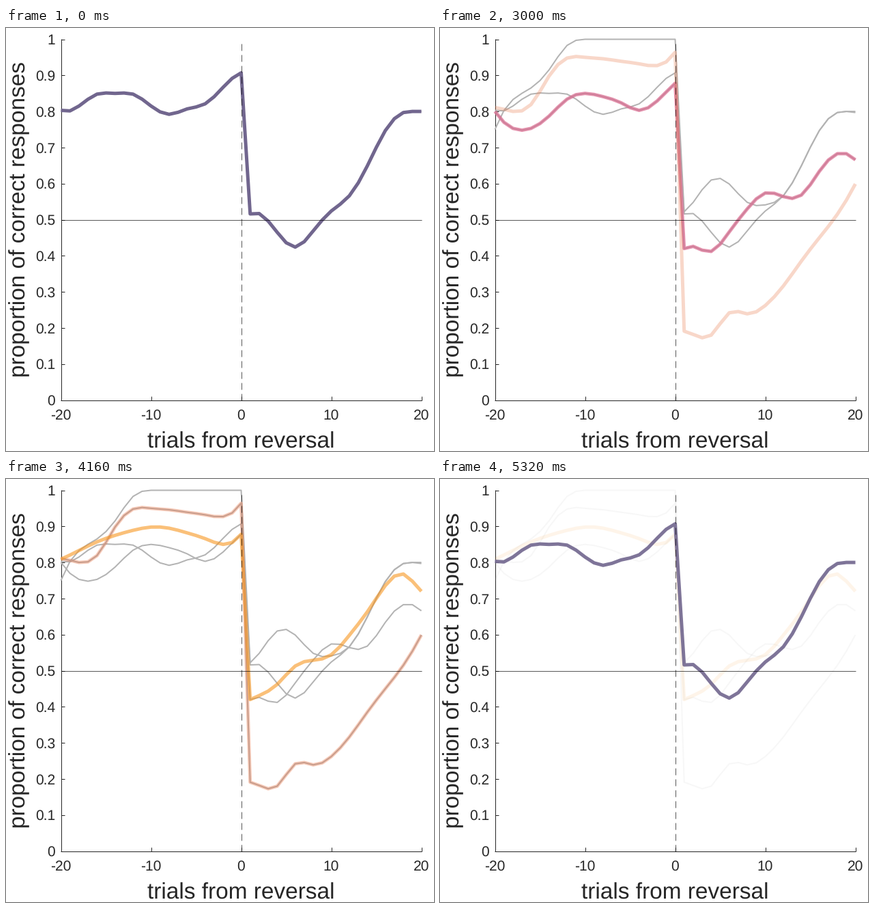
Write a matplotlib script that moves like this. It is 627 px wide and 619 px high and loops after 5350 ms.

```python
import numpy as np
import matplotlib.pyplot as plt
from matplotlib.animation import FuncAnimation

W, H, DPI = 627, 619, 64
LEFT, BOTTOM, SIDE = 80.5, 544.5, 528
INK = "#262626"
TICK_MS, HOLD, STEP, STEPS = 10, 800, 30, 10
CYCLE = HOLD + STEP * (STEPS - 1)

plt.rcParams.update({"font.family": "Liberation Sans", "text.hinting": "none"})


def pt(px):
    return px * 72 / DPI


def px_x(trial):
    return LEFT + (trial + 20) * SIDE / 40


def px_y(share):
    return BOTTOM - share * SIDE


def spline(knots, values, x):
    """Cubic not-a-knot spline through the given points."""
    def basis(u):
        cubes = [np.maximum(u - k, 0) ** 3 for k in knots[2:-2]]
        return np.column_stack([u ** p for p in range(4)] + cubes)
    return basis(x) @ np.linalg.solve(basis(knots), values)


# Sparse knots in thousandths, before and after the reversal
BEFORE = np.arange(-20, 1, 2) / 20
AFTER = np.array([1, *range(2, 19, 2), 19, 20]) / 20
trials = np.arange(-20, 21)


def curve(before, after):
    u = trials / 20
    y = np.concatenate([spline(BEFORE, before, u[u <= 0]),
                        spline(AFTER, after, u[u > 0])])
    return np.minimum(y / 1000, 1)


late = [566, 649, 747, 797, 800]
curves = {
    "#71668e": curve([803, 815, 848, 850, 848, 815, 792, 807, 821, 867, 907],
                     [516, 517, 465, 424, 469, 524, *late, 800]),
    "#a6658f": curve([750, 833, 865, 915, 983] + [1000] * 6,
                     [522, 548, 610, 599, 548, 541, *late, 797]),
    "#da678d": curve([800, 753, 753, 787, 834, 850, 841, 824, 803, 829, 878],
                     [420, 426, 412, 466, 530, 574, 564, 568, 634, 683, 683, 666]),
    "#e97b4f": curve([811, 800, 819, 898, 948, 950, 946, 939, 932, 927, 964],
                     [191, 182, 180, 242, 239, 262, 316, 385, 450, 515, 554, 599]),
    "#f79620": curve([809, 833, 857, 875, 889, 898, 895, 882, 866, 850, 878],
                     [420, 431, 462, 513, 529, 544, 598, 663, 736, 768, 748, 720]),
}

fig = plt.figure(figsize=(W / DPI, H / DPI), dpi=DPI, facecolor="white")
ax = fig.add_axes([0, 0, 1, 1])
ax.set_xlim(0, W)
ax.set_ylim(H, 0)
ax.axis("off")


def stroke(x, y, color, width=1, z=1, **kw):
    return ax.plot(x, y, color=color, lw=pt(width), zorder=z,
                   solid_capstyle="butt", **kw)[0]


def label(x, y, text, size=21, **kw):
    ax.text(x, y, text, fontsize=pt(size), color=INK, va="baseline", **kw)


# Axes with inward ticks
right, top = px_x(20), px_y(1)
stroke([LEFT, LEFT], [top - 0.5, BOTTOM + 0.5], INK)
stroke([LEFT - 0.5, right + 0.5], [BOTTOM, BOTTOM], INK)
for v in range(-20, 21, 10):
    x = px_x(v)
    stroke([x, x], [BOTTOM, BOTTOM - 5.5], INK)
    label(x, 573, str(v), ha="center")
for n in range(11):
    y = px_y(n / 10)
    stroke([LEFT, LEFT + 5.5], [y, y], INK)
    label(60.2 if n % 10 == 0 else 42.7, y + 7.5, f"{n / 10:g}")

label(344, 615, "trials from reversal", 33.33, ha="center")
label(28.5, 280.5, "proportion of correct responses", 33.33, ha="center",
      rotation=90, rotation_mode="anchor")

# Reference lines
stroke([LEFT, right], [px_y(0.5)] * 2, "black", z=10, alpha=0.65)
stroke([px_x(0)] * 2, [BOTTOM, top], "black", z=10, alpha=0.65,
       linestyle=(0, (10, 6)), dash_capstyle="butt")

thin, thick = [], []
for color, shares in curves.items():
    x, y = px_x(trials), px_y(shares)
    thin.append(stroke(x, y, "0.7", 2, 2))
    thick.append(stroke(x, y, color, 5, 3))
last = len(curves) - 1


def update(n):
    cur, t = divmod(n * TICK_MS, CYCLE)
    mix = 0 if t < HOLD else ((t - HOLD) // STEP + 1) / STEPS
    new = (cur + 1) % len(curves)
    trace = 1 - mix if cur == last else 1
    for k, (grey, line) in enumerate(zip(thin, thick)):
        grey.set_alpha(trace if k <= cur and k < last else 0)
        line.set_alpha(1 - mix if k == cur else mix if k == new else 0)
        line.set_zorder(4 if k == new else 3)
    return thin + thick


update(0)
anim = FuncAnimation(fig, update, frames=len(curves) * CYCLE // TICK_MS,
                     interval=TICK_MS, repeat=True, repeat_delay=0)
plt.show()
```
